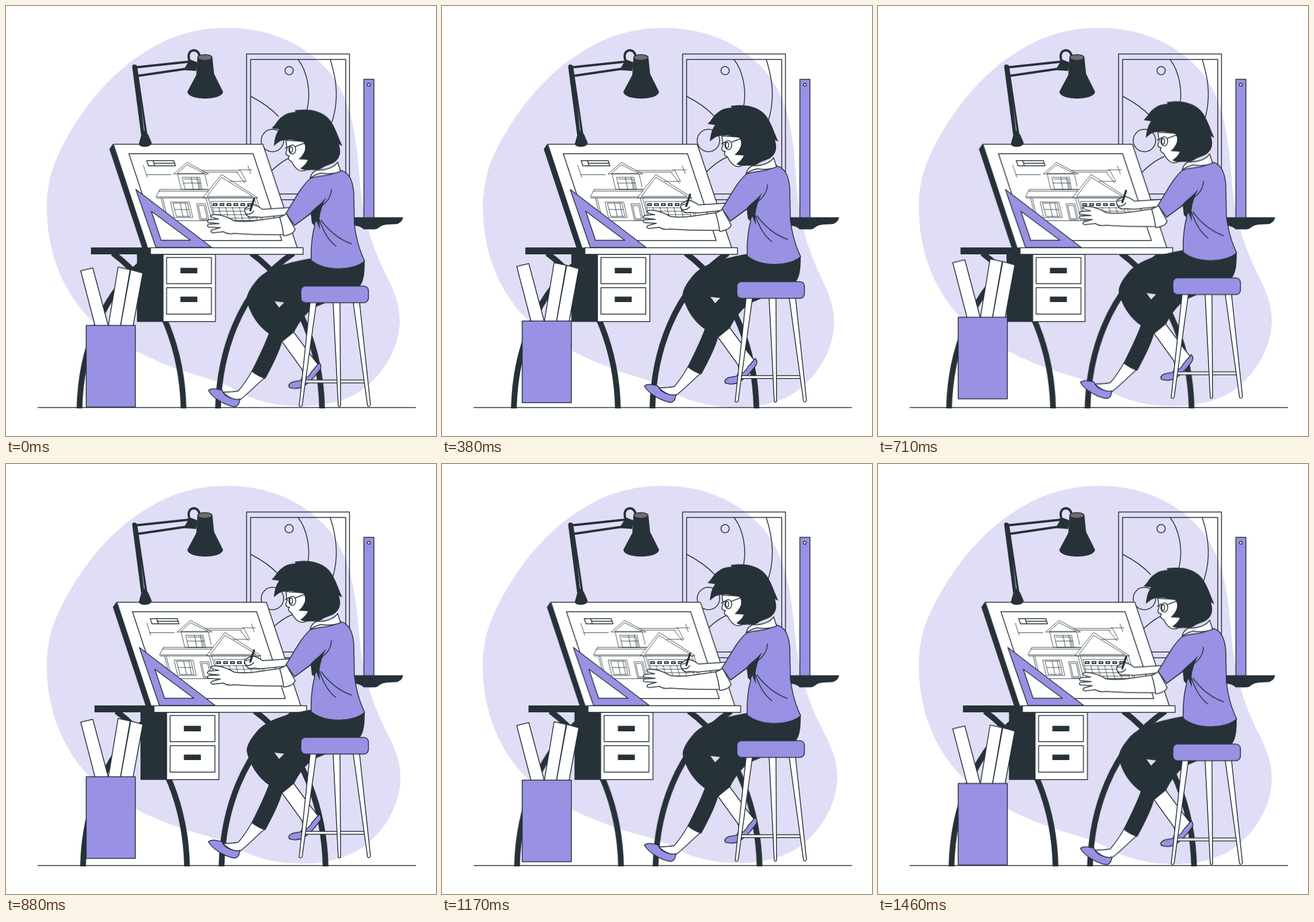
Animation, 748 px wide and 748 px high, one loop 1500 ms. Source, as an HTML page:

```html
<!DOCTYPE html>
<html lang="en">
<head>
<meta charset="utf-8">
<title>Architect at a drawing desk</title>
<style>
  html, body { margin: 0; width: 100%; height: 100%; overflow: hidden; background: #fff; }
  svg { display: block; width: 100vw; height: 100vh; stroke-linejoin: round; stroke-linecap: round; }

  .line { fill: none; stroke: #263238; stroke-width: 1.5; }
  .white { fill: #fff; stroke: #263238; stroke-width: 1.5; }
  .lilac { fill: #9891e4; stroke: #263238; stroke-width: 1.5; }
  .dark { fill: #263238; }
  .leg { fill: none; stroke: #263238; stroke-width: 10; stroke-linecap: butt; }
  .thin { fill: none; stroke: #263238; stroke-width: .85; }
  .blob { fill: #e0ddf6; transform-origin: 378px 367px; }

  .blob, .desk, .float { animation: 1.5s linear -20ms infinite; }
  .blob { animation-name: sway; }
  .desk { animation-name: shake; }
  .float { animation-name: float; }

  @keyframes sway {
    25% { transform: rotate(1deg); }
    75% { transform: rotate(-1deg); }
  }
  @keyframes float {
    50% { transform: translateY(-15px); }
  }
  @keyframes shake {
    10%, 90% { transform: translateX(-1.5px); }
    20%, 80% { transform: translateX(3px); }
    30%, 50%, 70% { transform: translateX(-6px); }
    40%, 60% { transform: translateX(6px); }
  }
</style>
</head>
<body>
<svg viewBox="0 0 748 748">
  <path class="blob" d="M385 38C470 38 530 75 565 118C600 165 609 220 615 300C620 370 640 425 660 465C676 497 685 520 685 546C685 600 650 650 610 674C580 690 550 696 515 696C470 696 430 686 400 668C370 650 345 648 300 632C240 610 190 585 150 548C100 500 71 430 71 350C71 300 85 270 100 240C140 165 190 110 250 75C290 50 335 38 385 38Z"/>

  <!-- wall picture -->
  <g class="line">
    <path d="M418.500 83.500H597.500V337H418.500ZM425.500 93H591V327H425.500Z"/>
    <circle cx="492.500" cy="112.500" r="7.200"/>
    <circle cx="463.500" cy="234" r="19.500"/>
    <path d="M508 93C523 112 533 150 522 186M564 93C576 130 579 165 567 202M425.500 157C445 167 461 178 474 192M448 302C462 285 478 270 498 262"/>
  </g>

  <!-- ruler on shelf -->
  <path class="lilac" d="M622.500 127.500H640V369H622.500Z"/>
  <circle class="white" cx="631" cy="137" r="2.500"/>
  <path class="dark" d="M605 367.500H691Q688 379 677 379.500C661 380 655 380 648 386Q645 388.500 640 388.500H622Q616 382 605 382Z"/>

  <g class="desk">
    <g class="leg">
      <g id="legs">
        <path d="M369 700C371 610 402 496 500 430M550 700C548 610 517 496 427 430"/>
      </g>
      <use href="#legs" x="-241"/>
    </g>
    <path class="dark" d="M148 420H252V432H148ZM228 420H273V549.500H228ZM180 249L186 240L252 421H237Z"/>
    <path class="white" d="M273.500 432H364.500V549H273.500ZM279.500 437.500H357.500V483H279.500ZM279.500 490H357.500V536H279.500Z"/>
    <path class="dark" d="M303.500 455.500H333V465H303.500ZM303.500 505.500H333V515H303.500Z"/>
    <path class="white" d="M187 240.500H447L507 421H246.500ZM214 257H430L480 408H264Z"/>
    <path class="white" d="M251.500 420.500H517V432H251.500Z"/>

    <!-- plan -->
    <path class="line" d="M245 269H292L295 278H248ZM256 269L259 278M258 273.500H293"/>
    <path class="thin" d="M239 277L246 298M244 293.500H287M405 285H428M421 278L426 292"/>
    <g class="thin">
      <path d="M292 292L315 272L352 292ZM298 291L315 276L345 291ZM299 293L305 319H352M346 293L351 314M307 298H337L341 319H312ZM310 301H335L338 317M322 298L326 319M332 298L336 319M309 308H339"/>
      <path d="M340 286H408L418 305H389M344 289H404M402 290L416 308M268 319H354M268 319L261 332H345M266 322H352M262 334H344M270 334L279 373M273 335L282 372"/>
      <path d="M343 333L375 293L437 333ZM350 331L375 298L429 331ZM345 334H437M348 334L358 373M352 334L363 373M432 334L444 373M436 334L447 373"/>
      <path d="M287 341H319L325 368H293ZM291 343H316L321 366H297ZM303 343L308 366M312 343L317 366M294 354H318"/>
      <path d="M332 344H347L353 372H338ZM335 347H345L350 370H340ZM279 373.500H448"/>
      <path d="M357 340H430L438 373H365ZM359 351H433M360 357H434M362 363H436M363 369H437M370 350L376 373M382 350L388 373M394 350L400 373M406 350L412 373M418 350L424 373"/>
    </g>
    <path d="M360 345.500H429" fill="none" stroke="#263238" stroke-width="5" stroke-linecap="butt" stroke-dasharray="8 4"/>
    <path d="M362 345.500H429" fill="none" stroke="#fff" stroke-width="1.600" stroke-linecap="butt" stroke-dasharray="4 8"/>

    <path class="lilac" fill-rule="evenodd" d="M226 319L358 420H261ZM253 357L270 407.500H321Z"/>
  </g>

  <!-- lamp -->
  <path d="M223 107L322 96.500M226 122L318 108.500" fill="none" stroke="#263238" stroke-width="4"/>
  <path class="dark" fill-rule="evenodd" d="M219.500 106Q220 101 224 102Q228 102 228.500 107L246 224H235ZM235 170L240 217L241 217Z"/>
  <path class="dark" d="M231 240L236 222Q239 217 244 220L247 223L253.500 238Q252 245 242 245Q232 245 231 240ZM320 93L333 98L331 113L308.500 111.500Z"/>
  <path d="M319 95C315 82 321 77 328 77Q335 78 337 88" fill="none" stroke="#263238" stroke-width="4"/>
  <path class="dark" d="M333 89L331 120L315.500 149C316 165 377 165 377.500 149L362 118L359 89Z"/>
  <ellipse cx="346" cy="89.500" rx="12.500" ry="5" fill="#706b70" stroke="#263238" stroke-width="1.500"/>

  <!-- paper bin -->
  <g class="float">
    <path class="white" d="M130 461L151 456L178 557H155Z"/>
    <path class="white" d="M217 459L238 465L221 557H199Z"/>
    <path class="white" d="M195 454.500L216 459L199 557H178Z"/>
    <path class="lilac" d="M139.500 556H225V698H139.500Z"/>
  </g>

  <g class="float">
    <!-- feet -->
    <path class="white" d="M480 584L500 567L531 609L543 624L531 640Q522 650 512 653Q520 640 514 631Z"/>
    <path class="lilac" d="M545 621Q550 627 546 633C537 645 528 656 515 663Q505 668 493 664Q489 658 500 654L512 652Q527 647 532 636Z"/>
    <path class="white" d="M428 635L450 647C436 659 420 676 405 687Q390 684 377 672Q393 672 404 670Q417 655 428 635Z"/>
    <path class="lilac" d="M352 669C358 664 368 667 376 669Q378 677 390 682Q400 686 407 684L405 692Q402 697 398 697.500C385 696 360 684 352 669Z"/>

    <path class="dark" fill-rule="evenodd" d="M533 439C490 446 457 456 439 474C425 490 417 504 419 513C424 535 438 557 457 570Q450 590 427 636Q438 645 451 649Q475 605 480 585L501 568C510 550 520 537 534 526Q548 520 560 515L608 494C622 486 624 470 624 444ZM467 514L484 516L475 525Z"/>

    <!-- stool -->
    <path class="white" d="M520 651H628V656H520Z"/>
    <path class="white" d="M529 516H540L515 696Q512 698 510 696Z"/>
    <path class="white" d="M604 516H615L634 694Q632 698 629 696Z"/>
    <path class="white" d="M569 516H581L582 696Q580 698 578 696Z"/>
    <rect class="lilac" x="513" y="487.500" width="117.500" height="29" rx="8"/>

    <!-- far hand and pen -->
    <path class="white" d="M494 351L446 354Q436 346 427 346L416 352Q414 357 417 362Q422 370 430 367L446 368L493 363Z"/>
    <path d="M431.500 336L425 356" stroke="#263238" stroke-width="3.500"/>
    <path class="line" d="M417 354Q424 353 428 350M418 362Q426 364 431 357"/>

    <!-- torso -->
    <path class="lilac" d="M530 300C545 295 565 297 582 286C598 290 603 305 605 325L606 380C609 405 616 428 624 444C603 461 557 463 531 443C530 425 532 400 537 382L531 360L502 382L487 361C503 336 514 313 530 300Z"/>
    <path class="dark" d="M557 333C547 346 534 353 530 360L532 378L536 382L540 374L546 389L545 372Q547 352 557 333Z"/>
    <path class="line" d="M545 372Q556 405 574 418M548 373Q570 403 601 414M566 319C566 337 553 347 531 361L502 382"/>
    <path class="white" d="M529 300Q531 290 540 286Q567 286 577 272L582 288Q567 294 548 291Q536 294 529 300Z"/>

    <!-- near arm -->
    <path class="white" d="M480 367L440 373Q415 377 397 374Q385 367 372 364Q356 362 356 366Q360 369 370 371L353 372Q348 375 352 377L371 379L352 380Q348 383 353 385L373 386L358 390Q354 394 360 395L378 393Q386 398 396 396Q440 399 484 398Z"/>
    <path class="white" d="M476 368L488 362L503 389Q500 398 483 400Q481 383 476 368Z"/>

    <!-- head -->
    <path class="white" d="M487 234L489 250Q486 256 487 258Q489 261 493 261L491 265Q493 270 497 271C500 278 506 286 513 287Q520 288 524 284L530 250L518 236Z"/>
    <path class="dark" d="M466 244C467 230 470 222 475 215L462 213C470 206 472 198 480 193C487 187 495 185 504 185L502 182C525 178 545 182 558 193C571 204 576 224 585 244L579 241C584 256 580 265 573 271C566 277 556 277 549 283C541 288 532 284 526 286Q517 286 512 283Q522 276 525 268L509 267Q517 260 520 251C521 244 520 241 517 237C505 235 496 231 484 234C478 234 472 238 466 244Z"/>
    <g class="line">
      <ellipse cx="498" cy="250" rx="6" ry="8"/>
      <ellipse cx="496" cy="250" rx="2.500" ry="5"/>
      <path d="M486 248L493 244M503 245L519 239"/>
    </g>
  </g>

  <path class="line" d="M55.500 698.500H712.500"/>
</svg>
</body>
</html>
```
